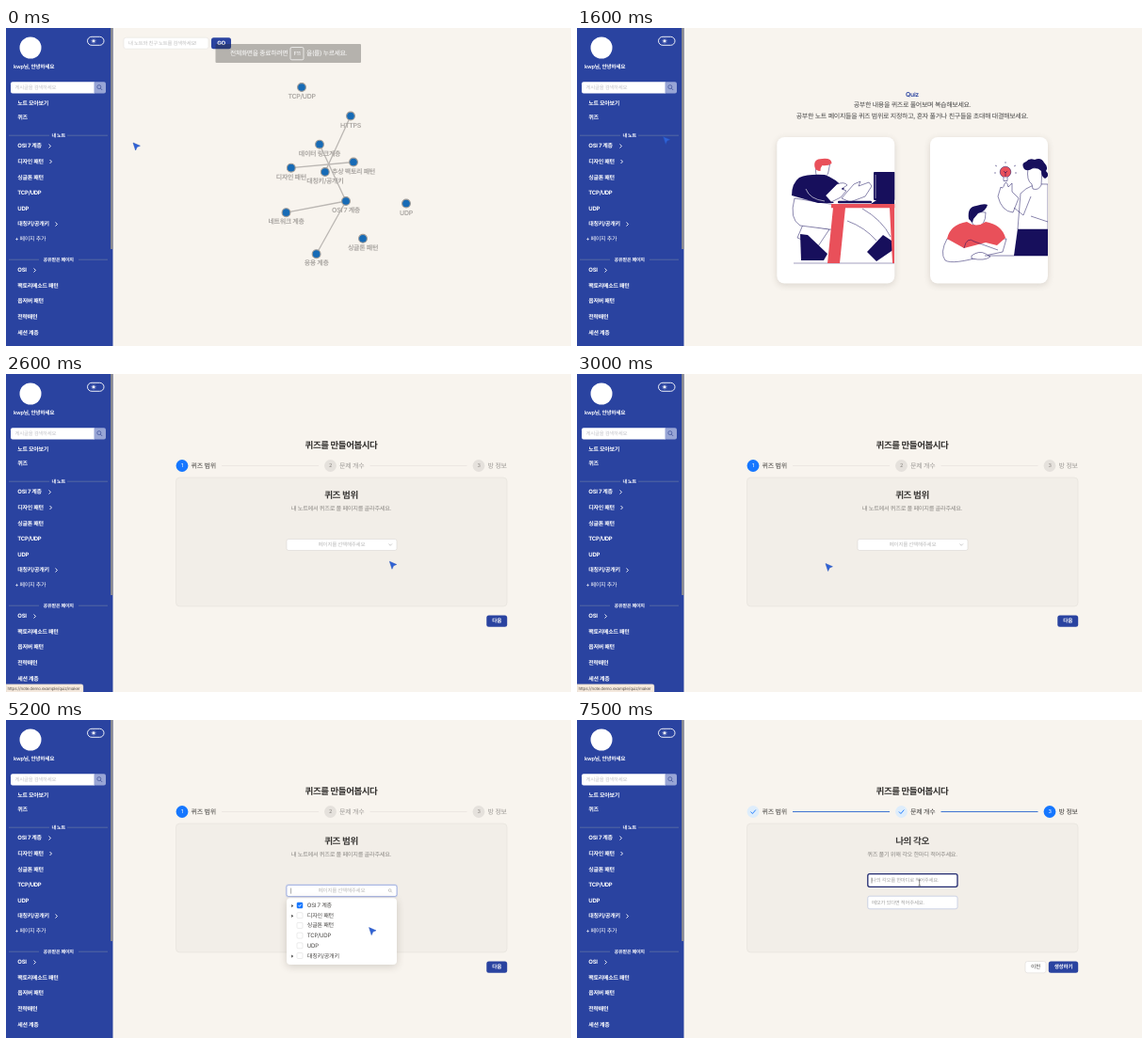
Animation of 600 by 338 pixels, one loop 8000 ms. Source, as an HTML page with a canvas:

```html
<!DOCTYPE html>
<html lang="ko">
<head>
<meta charset="utf-8">
<title>Quiz</title>
<style>
html, body { margin: 0; width: 100%; height: 100%; overflow: hidden; background: #f8f4ee; }
canvas { display: block; width: 600px; height: 338px; }
</style>
</head>
<body>
<canvas id="stage"></canvas>
<script>
const LOOP = 8000, STEP = 100;
const NAVY = '#2a43a0', BLUE = '#1677ff', CREAM = '#f8f4ee', INK = '#170f5c', RED = '#e9505a';
const FONT = 'Inter, "Noto Sans CJK KR", "Noto Sans CJK", sans-serif';
const canvas = document.getElementById('stage');
const ctx = canvas.getContext('2d');
const dpr = window.devicePixelRatio || 1;
canvas.width = 600 * dpr;
canvas.height = 338 * dpr;

const clamp = v => Math.max(0, Math.min(1, v));
const ramp = (t, a, b) => clamp((t - a) / (b - a));
const ease = v => v * v * (3 - 2 * v);
const mix = (a, b, k) => a + (b - a) * k;
const within = (t, a, b) => t >= a && t < b;

function text(str, x, y, size, color, weight = 400, align = 'left') {
  ctx.font = `${weight} ${size}px ${FONT}`;
  ctx.letterSpacing = `${-size * 0.045}px`;
  ctx.textRendering = 'geometricPrecision';
  ctx.textAlign = align;
  ctx.textBaseline = 'middle';
  ctx.fillStyle = color;
  ctx.fillText(str, x, y);
}
const centered = (str, x, y, size, color, weight) => text(str, x, y, size, color, weight, 'center');

function box(x, y, w, h, r, fill, stroke, lw = 0.6) {
  ctx.beginPath();
  ctx.roundRect(x, y, w, h, r);
  if (fill) { ctx.fillStyle = fill; ctx.fill(); }
  if (stroke) { ctx.strokeStyle = stroke; ctx.lineWidth = lw; ctx.stroke(); }
}
function disc(x, y, r, fill, stroke, lw = 1) {
  ctx.beginPath();
  ctx.arc(x, y, r, 0, Math.PI * 2);
  if (fill) { ctx.fillStyle = fill; ctx.fill(); }
  if (stroke) { ctx.strokeStyle = stroke; ctx.lineWidth = lw; ctx.stroke(); }
}
function path(d, fill, stroke, lw = 0.6) {
  const p = new Path2D(d);
  if (fill) { ctx.fillStyle = fill; ctx.fill(p); }
  if (stroke) { ctx.strokeStyle = stroke; ctx.lineWidth = lw; ctx.stroke(p); }
}
const outlined = d => path(d, '#fff', INK, 0.5);
const rule = (x1, x2, y, color, lw = 0.6) => path(`M${x1} ${y}H${x2}`, null, color, lw);
const chevron = (x, y, color) => path(`M${x - 1.8} ${y - 1}l1.8 1.8 1.8-1.8`, null, color, 0.7);
function lens(x, y, r, color, lw) {
  disc(x, y, r, null, color, lw);
  path(`M${x + r * 0.7} ${y + r * 0.7}l${r} ${r}`, null, color, lw);
}
function shadowed(blur, alpha, draw) {
  ctx.save();
  ctx.shadowColor = `rgba(60,50,40,${alpha})`;
  ctx.shadowBlur = blur * dpr;
  ctx.shadowOffsetY = 2 * dpr;
  draw();
  ctx.restore();
}

// Sidebar: label, y, chevron x
const MENU = [
  ['노트 모아보기', 80.5], ['퀴즈', 95.5],
  ['OSI 7 계층', 125.5, 46.5], ['디자인 패턴', 142, 47.5], ['싱글톤 패턴', 159],
  ['TCP/UDP', 175.5], ['UDP', 192], ['대칭키/공개키', 208.5, 53.5],
  ['OSI', 257.5, 30.5], ['팩토리메소드 패턴', 274], ['옵저버 패턴', 290.5],
  ['전략패턴', 307.5], ['세션 계층', 324]
];

function divider(label, y, x1, x2) {
  rule(3, x1, y, '#7180a6');
  rule(x2, 108, y, '#7180a6');
  centered(label, 55.7, y, 5.1, '#fff', 600);
}

function sidebar(t) {
  ctx.fillStyle = NAVY;
  ctx.fillRect(0, 0, 113.5, 338);
  ctx.fillStyle = '#918f8d';
  ctx.fillRect(111.2, 0, 2.3, 235);
  if (within(t, 900, 1600)) box(5, 89, 103, 14, 2, '#254ab0');

  disc(26, 21, 11.5, '#fff');
  text('kwp님, 안녕하세요', 8, 41, 5.7, '#fff', 600);

  box(86.5, 9.3, 17.5, 9, 4.5, null, '#fff', 0.9);
  disc(93, 13.8, 1.6, '#fff');
  for (let i = 0; i < 8; i++) {
    const a = i * Math.PI / 4;
    disc(93 + Math.cos(a) * 2.7, 13.8 + Math.sin(a) * 2.7, 0.35, '#fff');
  }

  box(5, 57.3, 89, 12.2, [2, 0, 0, 2], '#fff');
  box(93.5, 57.3, 12.5, 12.2, [0, 2, 2, 0], '#98a5d5');
  lens(98.8, 62.6, 2, '#46579d', 0.8);
  text('게시글을 검색하세요', 9.5, 63.4, 5.4, '#c2c2c7');

  divider('내 노트', 114.2, 46, 65);
  divider('공유받은 페이지', 246.2, 35, 77);
  for (const [label, y, cx] of MENU) {
    text(label, 12.3, y, 6, '#fff', 700);
    if (cx) path(`M${cx - 1} ${y - 2}l2 2-2 2`, null, '#fff', 0.9);
  }
  text('+ 페이지 추가', 9.5, 224, 6, '#fff', 500);
}

const NODES = [
  ['TCP/UDP', 314, 63], ['HTTPS', 366, 93.5], ['데이터 링크계층', 333, 123.7],
  ['디자인 패턴', 302.8, 148.7], ['대칭키/공개키', 338.8, 153], ['추상 팩토리 패턴', 369, 142.5],
  ['OSI 7 계층', 361, 184], ['네트워크 계층', 297.5, 196.2], ['응용 계층', 329.6, 240.2],
  ['싱글톤 패턴', 379, 223.8], ['UDP', 425, 186.5]
];
const EDGES = [[1, 4], [3, 5], [2, 6], [6, 7], [6, 8]];

function graphPage(t) {
  box(125, 10.2, 90, 12, 2.5, '#fff', '#e6e3df');
  text('내 노트와 친구 노트를 검색하세요!', 130, 16.3, 5.4, '#bebebe');
  box(218, 10.2, 21, 12, 2.5, NAVY);
  centered('GO', 228.5, 16.4, 6, '#fff', 700);

  for (const [a, b] of EDGES)
    path(`M${NODES[a][1]} ${NODES[a][2]}L${NODES[b][1]} ${NODES[b][2]}`, null, '#bbb7b3', 1.3);
  for (const [label, x, y] of NODES) {
    disc(x, y, 4.4, '#176bb6', '#a09c98', 1.1);
    centered(label, x, y + 10, 7, '#aaa6a2', 600);
  }

  const fade = 1 - ramp(t, 0, 400);
  if (fade > 0) {
    ctx.save();
    ctx.globalAlpha = fade;
    box(222.5, 17, 154.5, 20, 1, 'rgba(40,38,36,.32)');
    text('전체화면을 종료하려면', 238, 27.2, 6.8, '#fff');
    box(302, 20.5, 14, 13.3, 1.5, null, '#fff', 0.7);
    centered('F11', 309, 27.3, 5.6, '#fff');
    text('을(를) 누르세요.', 319, 27.2, 6.8, '#fff');
    ctx.restore();
  }
}

function soloArt(t) {
  const lean = (1 - Math.cos((t - 1200) / 800 * Math.PI)) / 2;
  rule(230, 337, 250, INK, 0.4);
  path('M287 205Q306 212 318 226M303 192Q324 204 333 222', null, INK, 0.5);
  outlined('M240 209L234 223 256 232 268 214z');
  outlined('M231 181Q225 203 237 210L276 215Q284 206 281 189z');
  path('M237 219L245 220 266 240 262 247 238 247z', INK);
  path('M308 238L325 220 337 228V235L318 248z', INK);

  ctx.save();
  ctx.translate(-15 * lean, -4 * lean);
  outlined('M262 146Q260 155 262 159 270 163 274 157L276 147z');
  path('M260 150Q258 141 268 141 278 140 278 146 273 149 268 148 266 150 266 154 261 154 260 150z', RED);
  ctx.restore();

  path('M228 178Q228 165 236 159 245 155 263 156 275 160 284 171L272 179 264 178 273 186H256z', INK);
  path('M243 171Q247 182 263 184', null, '#fff', 0.6);
  outlined('M264 178L276 166Q284 163 287 167L281 171 286 173 280 180 270 185z');
  outlined('M281 181L294 166 301 163 299 168 310 164 313 168 306 179 290 185z');
  path('M272 191H285L279 250H266zM332 191H337V250H335z', RED);
  box(270, 187, 68, 4.2, 0, RED);
  box(277, 183.7, 36, 2.6, 1, INK);
  box(315, 153, 23, 30, 1, INK);
  path('M318 183H337V187H312z', INK);
  path('M317 156V181', null, '#fff', 0.5);
}

function groupArt(t) {
  const lit = t >= 1600;
  path('M468 213H500V242H464z', INK);
  outlined('M471 176Q482 164 500 166V214H468z');
  outlined('M447 179L450 169Q452 172 454 166 456 161 458 169L462 165 462 174 469 181 463 196Q451 195 447 179z');
  path('M464 191L474 199 482 179M482 200L500 206', null, INK, 0.5);
  outlined('M479 149Q477 162 483 166L484 171Q490 173 493 167L494 149z');
  path('M475 150Q471 144 477 142 480 138 486 140 493 137 496 143 501 148 498 152 503 157 497 160 493 158 493 152 489 148 484 149 479 153 475 150z', INK);
  disc(455, 153, 5.8, lit ? RED : '#fff', INK, 0.5);
  outlined('M453 158.5v4h4v-4');
  path('M455 158v-5M453 152l2 2 2-2', null, INK, 0.5);
  if (lit) path('M446 147l-2-1M464 147l2-1M455 144v-2M445 154h-2M465 154h2', null, INK, 0.5);

  outlined('M393 224Q385 239 391 247 399 252 433 242L452 238 456 224z');
  outlined('M419 195Q416 208 424 211 434 211 434 196z');
  path('M393 224Q396 209 414 206 424 213 434 206 451 209 455 223L446 231 434 228 411 234z', RED);
  path('M411 234Q414 221 422 227L447 236', null, INK, 0.5);
  path('M416 203Q414 190 424 189 433 186 436 188 434 195 426 197L421 203 420 207z', INK);
  outlined('M419 242q8-6 15-2l5 3q-6 5-20 2z');
  rule(433, 500, 242, INK, 0.5);
}

function card(x, art, t, hover, label) {
  const cx = x + 62.5, cy = 193.5, k = 1 + 0.05 * hover;
  ctx.save();
  ctx.translate(cx, cy - hover);
  ctx.scale(k, k);
  ctx.translate(-cx, -cy);
  shadowed(7, 0.16, () => box(x, 116, 125, 155.5, 8, '#fff'));
  ctx.save();
  ctx.beginPath();
  ctx.roundRect(x, 116, 125, 155.5, 8);
  ctx.clip();
  art(t);
  ctx.fillStyle = `rgba(255,255,255,${0.7 * hover})`;
  ctx.fillRect(x, 116, 125, 156);
  ctx.restore();
  if (hover > 0) {
    ctx.globalAlpha = hover;
    box(x + 0.5, 116.5, 124, 154.5, 8, null, NAVY, 1.6);
    centered(label, cx, 192.5, 8, NAVY, 700);
  }
  ctx.restore();
}

function quizPage(t) {
  centered('Quiz', 356, 70.7, 6.8, NAVY, 600);
  centered('공부한 내용을 퀴즈로 풀어보며 복습해보세요.', 356, 81.7, 7, '#444');
  centered('공부한 노트 페이지들을 퀴즈 범위로 지정하고, 혼자 풀거나 친구들을 초대해 대결해보세요.', 356, 94, 7, '#444');
  card(212.3, soloArt, t, 0, '혼자 풀기');
  card(375, groupArt, t, ease(ramp(t, 1750, 2000)), '같이 풀기');
}

const STAGES = [['퀴즈 범위', 187], ['문제 개수', 344.5], ['방 정보', 502]];

function stepper(active) {
  STAGES.forEach(([label, x], i) => {
    const done = i < active, on = i === active;
    disc(x, 97.5, 6.4, on ? BLUE : done ? '#deedfb' : '#e5e1dc');
    if (done) path(`M${x - 2.6} 97.5l2 2 3.4-4`, null, BLUE, 0.9);
    else centered(i + 1, x, 97.8, 5.6, on ? '#fff' : '#8b8783');
    text(label, x + 9.6, 97.6, 7, on || done ? '#3c3a38' : '#9d9a96');
    if (i < 2) rule(x + 42, x + 145, 97.5, done ? '#3f75d2' : '#e7e3dd', done ? 1.1 : 0.7);
  });
}

function panel(title, sub) {
  box(180.5, 110, 351.5, 137, 4, '#f2eee8', '#e5e1db', 0.6);
  centered(title, 356, 128.7, 9.6, '#3a3836', 600);
  centered(sub, 356, 143.2, 6.2, '#8b8884');
}

function button(label, x, w, fill, color, border) {
  box(x, 256.5, w, 12.3, 2.5, fill, border);
  centered(label, x + w / 2, 262.8, 5.6, color, border ? 400 : 600);
}
const backButton = x => button('이전', x, 22, '#fff', '#3c3a38', '#dedbd7');
function nextButton(glow) {
  const c = [[42, 58], [67, 126], [160, 230]].map(([a, b]) => Math.round(mix(a, b, glow)));
  button('다음', 510.3, 21.9, `rgb(${c})`, '#fff');
}

// Tree rows: label, expandable
const ROWS = [['OSI 7 계층', 1], ['디자인 패턴', 1], ['싱글톤 패턴'], ['TCP/UDP'], ['UDP'], ['대칭키/공개키', 1]];

function rangeStep(t) {
  panel('퀴즈 범위', '내 노트에서 퀴즈로 풀 페이지를 골라주세요.');
  const open = ramp(t, 3600, 3800) - ramp(t, 5200, 5400);
  const focus = open > 0;
  if (focus) box(297.6, 175, 117.6, 13, 2.5, null, 'rgba(70,110,230,.16)', 1.6);
  box(298, 175.5, 117, 12, 2, '#fff', focus ? '#7d93d8' : '#dad7d3');
  centered('페이지를 선택해주세요', 356.5, 181.7, 5.5, '#b9b9b9');
  if (focus) {
    lens(407.6, 181, 1.4, '#aaa', 0.6);
    path('M302.6 178.6v6', null, '#555', 0.5);
  } else chevron(408.2, 181.5, '#b3b3b3');
  nextButton(ramp(t, 5400, 5600));
  if (!focus) return;

  ctx.save();
  ctx.globalAlpha = open;
  ctx.translate(0, 189);
  ctx.scale(1, mix(0.8, 1, open));
  ctx.translate(0, -189);
  shadowed(8, 0.2, () => box(298, 189.3, 117, 70.7, 4, '#fff'));
  ROWS.forEach(([label, expands], i) => {
    const y = 197 + i * 10.7;
    if (expands) path(`M303.2 ${y - 1}l2 1.6-2 1.6z`, '#444');
    const checked = i === 0 && t >= 4600;
    box(309, y - 3, 6, 6, 1, checked ? BLUE : '#fff', checked ? BLUE : '#d6d6d6', 0.5);
    if (checked) path(`M310.5 ${y}l1.2 1.3 2-2.5`, null, '#fff', 0.8);
    text(label, 319.8, y + 0.2, 6.1, '#484644');
  });
  ctx.restore();
}

function countStep(t) {
  panel('문제 개수', '페이지 당 생성 가능한 문제 수는 최소 1개, 최대 3개입니다.');
  box(333, 175.5, 46.7, 12, 2, '#fff', '#dad7d3');
  centered('1개', 353, 181.7, 5.8, '#484644');
  chevron(373, 181.5, '#b3b3b3');
  backButton(485.8);
  nextButton(1 - ramp(t, 6150, 6350) + ramp(t, 6600, 6800));
}

function roomStep(t) {
  panel('나의 각오', '퀴즈 풀기 위해 각오 한마디 적어주세요.');
  const focus = t >= 7300;
  box(308.8, 163.7, 95.2, 13.6, 2, '#fff', focus ? '#20296f' : '#b9c3e0', focus ? 1.3 : 0.7);
  box(308.8, 187.2, 95.2, 13.6, 2, '#fff', '#b9c3e0', 0.7);
  text('나의 각오를 한마디로 적어주세요.', 313, 170.7, 5.4, '#a5a5a5');
  text('메모가 있다면 적어주세요.', 313, 194.2, 5.4, '#a5a5a5');
  if (focus) path('M313 167.5v6', null, '#333', 0.5);
  backButton(476);
  button('생성하기', 500.8, 31.4, NAVY, '#fff');
}

function makerPage(t) {
  const active = t < 5800 ? 0 : t < 6900 ? 1 : 2;
  centered('퀴즈를 만들어봅시다', 356, 75.7, 9.5, '#33312f', 600);
  stepper(active);
  [rangeStep, countStep, roomStep][active](t);
}

function statusBar(t) {
  const url = 'https://note.demo.example/quiz';
  const show = (tail, w, fill, ink) => {
    box(0, 329.8, w, 8.5, [0, 2, 0, 0], fill, '#c9c4bf', 0.4);
    text(url + tail, 1.5, 334.2, 4.6, ink);
  };
  if (within(t, 1000, 1600)) show('', 66.5, '#bfc3cb', '#4a5a94');
  else if (within(t, 1900, 2500)) show('/room', 79.5, '#f6eade', '#5a5652');
  else if (within(t, 2500, 3300)) show('/maker', 82, '#f6eade', '#5a5652');
}

// Pointer: time, x, y
const TRACK = [
  [0, 135, 122], [700, 135, 122], [1000, 30, 100], [1500, 30, 100], [1900, 424, 199],
  [2500, 424, 199], [3000, 264, 201.5], [3300, 264, 201.5], [3700, 365.5, 185],
  [4200, 365.5, 185], [4600, 312, 197], [5000, 312, 197], [5500, 521, 264],
  [6000, 521, 264], [6100, 483, 250], [6400, 357, 182], [6500, 357, 182],
  [6800, 521, 264], [6900, 521, 264], [7300, 363.7, 173], [8000, 363.7, 173]
];

function pointer(t) {
  const i = TRACK.findIndex((p, n) => n && t < p[0]);
  const [t0, x0, y0] = TRACK[i - 1], [t1, x1, y1] = TRACK[i];
  const k = ease(ramp(t, t0, t1));
  ctx.save();
  ctx.translate(mix(x0, x1, k), mix(y0, y1, k));
  if (within(t, 950, 1600) || within(t, 1850, 2600)) {
    path('M-1 0Q0-1 1 0V3L4.2 4Q5 5 3.6 8H-.2L-3 4.5Q-2.8 3.4-1 5z', '#fff', '#333', 0.5);
  } else if (within(t, 3600, 4300) || t >= 7200) {
    path('M-1.2-3H1.2M0-3V3M-1.2 3H1.2', null, '#444', 0.6);
  } else {
    path('M0 0L7.4 3.2 4.2 4.5 2.6 8z', '#2f62d6', '#2450b8', 0.5);
  }
  ctx.restore();
}

function render(t) {
  ctx.setTransform(dpr, 0, 0, dpr, 0, 0);
  ctx.fillStyle = CREAM;
  ctx.fillRect(0, 0, 600, 338);
  (t < 1100 ? graphPage : t < 2600 ? quizPage : makerPage)(t);
  sidebar(t);
  statusBar(t);
  pointer(t);
}

const start = performance.now();
function tick() {
  const t = (performance.now() - start) % LOOP;
  render(Math.floor(t / STEP) * STEP);
  requestAnimationFrame(tick);
}
tick();
</script>
</body>
</html>
```
